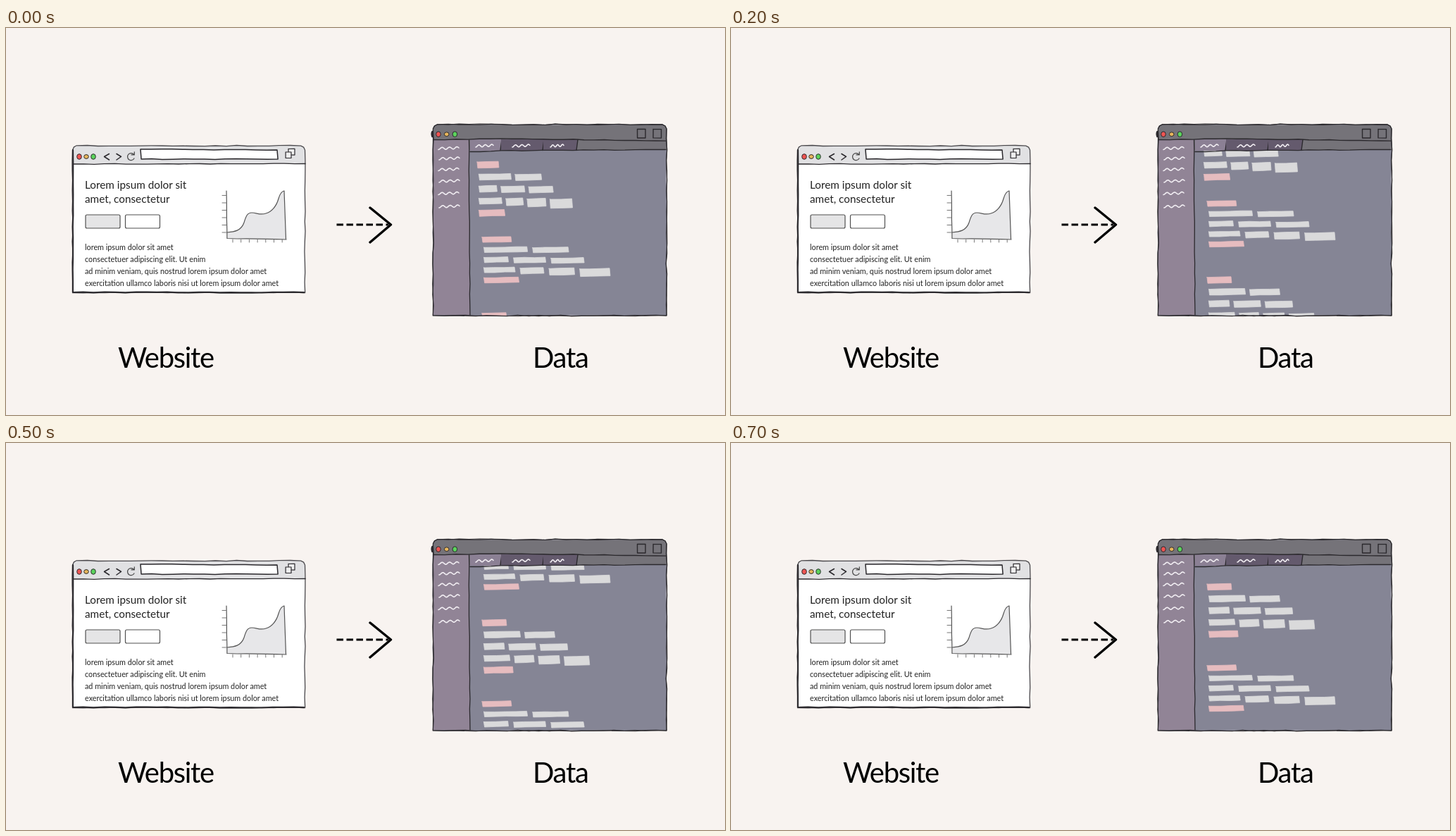
Animation, 1021 px wide and 549 px high, one loop 0.8 s. Source, as an HTML page:

```html
<!DOCTYPE html>
<html lang="en">
<head>
<meta charset="utf-8">
<title>Website to data</title>
<style>
  html, body { margin: 0; width: 100%; height: 100%; overflow: hidden; background: #f8f3f0; }
  svg { display: block; width: 100%; height: 100%; }
  text { font-family: Lato, "Open Sans", sans-serif; fill: #222; }
  .heading { font-size: 15.3px; }
  .body { font-size: 10.8px; }
  .caption { font-size: 40px; letter-spacing: -1.3px; fill: #000; }
</style>
</head>
<body>
<svg viewBox="0 0 1021 549">
  <defs><clipPath id="pane"><rect x="659" y="173" width="279" height="235.5"/></clipPath></defs>
  <g id="site"></g>
  <g fill="none" stroke="#000">
    <path d="M469.5 279H543" stroke-width="3" stroke-dasharray="9.5 4.5"/>
    <path d="M517 255L546.5 279L517 304" stroke-width="3.4" stroke-linecap="round" stroke-linejoin="round"/>
  </g>
  <g id="editor"></g>
  <text class="caption" x="159" y="482">Website</text>
  <text class="caption" x="748" y="482">Data</text>
</svg>
<script>
const INK = '#2b292d';
const STEP_MS = 100;
const STEPS = 8;

let seed = 7;
const rand = () => (seed = (seed * 16807) % 2147483647) / 2147483647;
const jitter = amount => (rand() * 2 - 1) * amount;

function add(parent, tag, attrs = {}, text = '') {
  const node = document.createElementNS('http://www.w3.org/2000/svg', tag);
  for (const key in attrs) node.setAttribute(key, attrs[key]);
  node.textContent = text;
  return parent.appendChild(node);
}

function draw(parent, d, fill = 'none', stroke = INK, width = 1.3) {
  return add(parent, 'path', {
    d, fill, stroke, 'stroke-width': width, 'stroke-linecap': 'round', 'stroke-linejoin': 'round'
  });
}

// A hand-drawn line through the given corners.
function rough(corners, amount = 0.5, closed = false) {
  const ends = closed ? [...corners, corners[0]] : corners;
  const points = [ends[0]];
  for (let i = 1; i < ends.length; i++) {
    const [x0, y0] = ends[i - 1], [x1, y1] = ends[i];
    const count = Math.max(1, Math.round(Math.hypot(x1 - x0, y1 - y0) / 15));
    for (let k = 1; k <= count; k++) {
      const shake = k < count ? amount : amount / 3;
      points.push([x0 + (x1 - x0) * k / count + jitter(shake),
                   y0 + (y1 - y0) * k / count + jitter(shake)]);
    }
  }
  return 'M' + points.map(p => p.map(v => v.toFixed(1)).join(' ')).join('L') + (closed ? 'Z' : '');
}

const box = (x, y, w, h, amount = 0.3) =>
  rough([[x, y], [x + w, y], [x + w, y + h], [x, y + h]], amount, true);

// A box with softened top corners.
const frame = (x, y, w, h, amount = 0.6, r = 6) => rough([
  [x, y + r], [x + r / 3, y + r / 3], [x + r, y], [x + w - r, y],
  [x + w - r / 3, y + r / 3], [x + w, y + r], [x + w, y + h], [x, y + h]
], amount, true);

function lights(parent, x, y, gap) {
  ['#ef5553', '#e8b75c', '#5bd45c'].forEach((fill, i) => add(parent, 'ellipse', {
    cx: x + i * gap, cy: y, rx: 3.3, ry: i === 1 ? 2.9 : 3.8, fill, stroke: INK, 'stroke-width': 1
  }));
}

function squiggle(parent, x, y, width) {
  let d = `M${x} ${y + 1.5}`;
  for (let t = 1; t <= 20; t++) {
    const wave = Math.cos(t / 20 * Math.PI * 5.5) * 1.6;
    d += `L${(x + width * t / 20).toFixed(1)} ${(y + wave - t / 20).toFixed(1)}`;
  }
  draw(parent, d, 'none', '#f1edf2', 1.6);
}

function drawChart(g) {
  const curve = 'M314 290C324 289 334 288 338 276C341 266 343 262 349 262C356 262 361 266 369 263' +
    'C377 261 384 253 387 242C389 235 391 232 395 231L397.5 299.5';
  draw(g, curve + 'L314 298.5Z', '#e7e7e9', 'none');
  draw(g, curve, 'none', '#555', 1.2);
  draw(g, rough([[313, 231], [314, 298.5], [398, 300]], 0.3), 'none', '#555', 1.2);
  let ticks = '';
  for (let i = 0; i < 6; i++) ticks += `M307 ${237.5 + i * 10.5}h5.5`;
  for (let i = 0; i < 7; i++) ticks += `M${322 + i * 11.7} 300v4`;
  draw(g, ticks, 'none', '#777', 1);
}

function drawSite(g) {
  draw(g, frame(94.5, 167, 330, 208.5), '#fff', 'none');
  draw(g, frame(95, 167.5, 329, 25, 0.3), '#e1e1e3', 'none');
  draw(g, frame(94.5, 167, 330, 208.5), 'none', '#4a484c', 1.3);
  draw(g, rough([[95, 173], [95, 375], [423, 375]]), 'none', INK, 2.2);
  draw(g, rough([[95, 193], [425, 192.5]]), 'none', INK, 1.3);

  lights(g, 104, 182.5, 10);
  draw(g, 'M146.5 178.5L139.5 182.5L146.5 187M157 178.5L163.5 182.5L157 187', 'none', INK, 1.5);
  draw(g, 'M181.5 179.5A5 5 0 1 0 182 185M178 179.8L182.3 180L182.3 175.8', 'none', '#444', 1.2);
  draw(g, rough([[191, 172], [385, 173], [386, 186], [192, 186]], 0.5, true), '#fff', INK, 1.5);
  draw(g, box(401, 171.5, 9, 8.5), '#eee', INK, 1.2);
  draw(g, box(397, 176, 8, 8.5), '#eee', INK, 1.2);

  const write = (cls, y, pitch, lines) => lines.forEach((line, i) =>
    add(g, 'text', { class: cls, x: 112, y: y + i * pitch }, line));
  write('heading', 227.5, 20, ['Lorem ipsum dolor sit', 'amet, consectetur']);
  write('body', 315.3, 16.9, [
    'lorem ipsum dolor sit amet',
    'consectetuer adipiscing elit. Ut enim',
    'ad minim veniam, quis nostrud lorem ipsum dolor amet',
    'exercitation ullamco laboris nisi ut lorem ipsum dolor amet'
  ]);

  ['#e5e5e6', '#fff'].forEach((fill, i) => add(g, 'rect', {
    x: 113 + i * 56.5, y: 265, width: 49, height: 19, rx: 2, fill, stroke: '#505050', 'stroke-width': 1.2
  }));
  drawChart(g);
}

// Chip widths of one code block, row by row; the first and last rows are tags.
const ROWS = [[31], [46, 38], [26, 34, 35], [33, 25, 27, 32], [37]];

function codeBlock(parent, x, y, scaleX, scaleY) {
  const block = add(parent, 'g');
  ROWS.forEach((widths, row) => {
    const isTag = widths.length === 1;
    const fill = isTag ? '#e6bcbf' : '#dadadb';
    let left = row ? 2.5 : 0;
    widths.forEach((width, i) => {
      const w = width * scaleX;
      const h = (row === 3 ? 8.5 + i * 1.5 : 9 - row % 2 * 0.3) * scaleY;
      const middle = y + row * 17.1 * scaleY + i * (row === 3 ? 1.2 : 0.5);
      const x0 = x + left, top = middle - h / 2, bottom = middle + h / 2;
      draw(block, rough([
        [x0, top + 0.6], [x0 + w - 1, top - 0.4], [x0 + w, bottom - 0.6], [x0 + 1, bottom + 0.4]
      ], 0.4, true), fill, fill, 0.8);
      left += w + 5.3 * scaleX;
    });
  });
  return block;
}

function drawTabs(g) {
  draw(g, frame(607, 137.5, 331, 35.5, 0.3), '#757379', 'none');
  draw(g, 'M607 158H658L659 407.5L607 407Z', '#918496', 'none');
  const edges = [659, 703, 763, 811];
  for (let i = 0; i < 3; i++) {
    const left = edges[i], right = edges[i + 1];
    draw(g, `M${left} 158H${right + 1}L${right - 1} 174H${left}Z`, i ? '#645a6d' : '#8b8094', 'none');
    draw(g, `M${right + 1} 158.5L${right - 1} 173.5`, 'none', INK, 1.4);
    squiggle(g, (left + right) / 2 - 14, 167.5, i < 2 ? 25 : 19);
  }
  for (let i = 0; i < 6; i++) squiggle(g, 614 + i % 2, 171 + 14 * i + i * i / 2, 29);
}

function drawEditor(g) {
  draw(g, frame(606, 137, 332, 271), '#858595', 'none');
  const code = add(add(g, 'g', { 'clip-path': 'url(#pane)' }), 'g');
  codeBlock(code, 669, 194, 1, 1);
  codeBlock(code, 676, 300, 1.35, 0.84);
  codeBlock(code, 676, 408.5, 1.13, 0.98);
  const lastBlock = codeBlock(code, 676, 523.5, 1.35, 0.84);

  drawTabs(g);
  draw(g, rough([[607, 158.5], [704, 157], [937, 160]]), 'none', INK, 1.4);
  draw(g, rough([[659, 175.5], [703, 174], [937, 172.5]]), 'none', INK, 1.3);
  draw(g, rough([[657.5, 159], [657.5, 230], [659, 407]]), 'none', INK, 1.3);
  for (let pass = 0; pass < 2; pass++) draw(g, frame(606.5, 136.8, 331.5, 271.2, 0.8), 'none', INK, 1.1);
  draw(g, 'M605.5 147Q604 150 605.5 154', 'none', INK, 2.6);

  lights(g, 614, 150.7, 11.7);
  for (const x of [896.5, 919]) draw(g, box(x, 143.5, 11.5, 12.5), 'none', INK, 1.4);
  return { code, lastBlock };
}

drawSite(document.getElementById('site'));
const { code, lastBlock } = drawEditor(document.getElementById('editor'));

// Even steps, with a faster stretch in the middle of the loop.
const scrollAt = step => 25.5 * step + Math.min(26, 15 * Math.max(0, step - 3));

function update(ms) {
  const step = Math.floor(ms / STEP_MS) % STEPS;
  code.setAttribute('transform', `translate(0 ${-scrollAt(step)})`);
  lastBlock.setAttribute('visibility', step < STEPS / 2 ? 'hidden' : 'visible');
}

const start = performance.now();
function tick() {
  update(performance.now() - start);
  requestAnimationFrame(tick);
}
tick();
</script>
</body>
</html>
```
